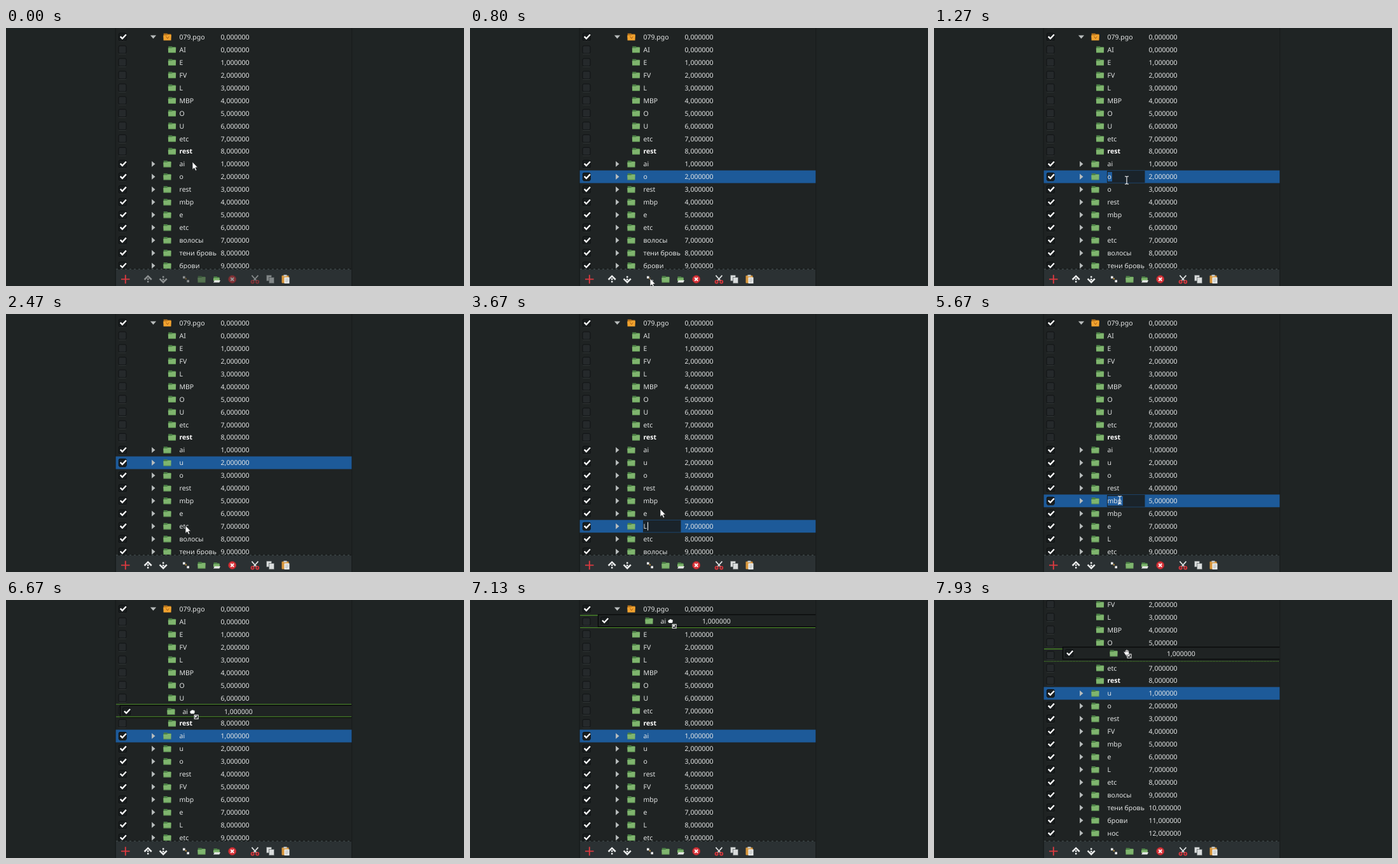
Animation of 720x405 px, one loop 8 s. Source, as an HTML page:

```html
<!DOCTYPE html>
<html lang="en">
<head>
<meta charset="utf-8">
<title>Layer list</title>
<style>
html, body { margin: 0; width: 100%; height: 100%; overflow: hidden; background: #1f2424; }
svg { display: block; width: 100vw; height: 100vh; }
text { font: 10.5px "Noto Sans", "Open Sans", sans-serif; fill: #e4e6e6; text-rendering: geometricPrecision; }
.bold { font-weight: 700; fill: #fff; }
</style>
</head>
<body>
<svg viewBox="0 0 720 405" xmlns="http://www.w3.org/2000/svg">
  <defs>
    <clipPath id="panel"><rect x="172.6" y="0" width="370.8" height="378"/></clipPath>
    <g id="box"><rect x="-6" y="-6" width="12" height="12" rx="2" fill="#25292b" stroke="#101314"/>
      <path d="M-5.5 6.9H5.5" stroke="#363b3c" stroke-width=".8"/></g>
    <g id="check"><rect x="-6" y="-6" width="12" height="12" rx="2" fill="#191d1e" stroke="#0e1112"/>
      <path d="M-5 6.9H5" stroke="#303536" stroke-width=".7"/>
      <path d="M-3.6 -.6L-.4 2.6L5.6 -3.8" fill="none" stroke="#fff" stroke-width="2.3"/></g>
    <g id="folder"><path d="M-5.8 -5.2H-.2L.8 -4.2H5.6V2H-5.8Z" fill="#4c8046"/>
      <path d="M-6.2 -2.4H-.4L1 -3.4H6.2L5.9 5H-5.9Z" fill="#7fb56e"/>
      <path d="M-5.9 4.7H5.9" stroke="#568a4d" stroke-width=".9"/></g>
    <g id="group"><path d="M-5.8 -5.4H-.2L.8 -4.4H5.8V1H-5.8Z" fill="#b8741c"/>
      <path d="M-6.2 -2.6H-.4L1 -3.6H6.4L6 5.4H-5.9Z" fill="#f2a32f"/>
      <path d="M-2 -.8L.4 2.6L2.6 -.6" fill="none" stroke="#a85d12"/></g>
    <path id="closed" d="M-2.4 -4.6L3 0L-2.4 4.6Z" fill="#b9bdbd"/>
    <path id="open" d="M-4.6 -2.4H4.6L0 2.8Z" fill="#b9bdbd"/>
    <path id="arrow" d="M0 0V12.4L2.9 9.8L5 14.2L7 13.2L5 9H8.6Z" fill="#fff" stroke="#15191a" stroke-width=".8"/>
    <path id="beam" d="M-3 -6H-1L0 -5L1 -6H3M0 -5V5M-3 6H-1L0 5L1 6H3" fill="none" stroke="#fff" stroke-width="1.1"/>
    <g id="target"><rect x="-3" y="-3" width="6" height="6" fill="#0d1011" stroke="#fff" stroke-width="1"/>
      <path d="M-1.6 -1.6H1L-1.6 1ZM-1 -1L1.8 1.8" fill="#fff" stroke="#fff" stroke-width=".8"/></g>
    <g id="fist"><path d="M-4 0L-2.6 -1V-2H-1V-2.8H1.6V-2H3.6V1.4L2.8 3H-2.4Z" fill="#fff"/><use href="#target" x="6.2" y="8.2"/></g>
    <g id="palm"><path d="M-5 -2.4L-4 -3.2L-2.6 -2V-5H-1V-6.2H.6V-5.4H2.2V-4.4H3.6V0L2.6 2.6H-2Z" fill="#fff" stroke="#15191a" stroke-width=".6"/>
      <path d="M-1 -4.6V-2M.6 -4.6V-2M2.2 -4V-2" stroke="#333" stroke-width=".6"/><use href="#target" x="4" y="4"/></g>
  </defs>
  <rect width="720" height="405" fill="#1f2424"/>
  <rect x="171.5" width="1.5" height="405" fill="#181c1c"/>
  <rect x="543" width="1.2" height="405" fill="#191d1d"/>
  <rect x="173" width="370" height="405" fill="#1f2323"/>
  <g id="list" clip-path="url(#panel)"></g>
  <rect x="173" y="378" width="370" height="27" fill="#2b3133"/>
  <path d="M173 378.4H543" stroke="#121616"/>
  <path d="M173 378.4H543" stroke="#465050" stroke-dasharray="3 4"/>
  <path d="M181 394.4H194.5M187.8 387.6V401.2" stroke="#dc3a40" stroke-width="1.9"/>
  <g id="tools">
    <g fill="none" stroke="#eceeee" stroke-width="2.5">
      <path d="M217.6 395L223.2 389.4L228.8 395"/><path d="M223.2 393V400" stroke-dasharray="2.4 1.6"/>
      <path d="M241.6 393.6L247.2 399.2L252.8 393.6"/><path d="M247.2 396V388.6" stroke-dasharray="2.4 1.6"/>
    </g>
    <rect x="278" y="389.6" width="3.6" height="3.6" fill="#eee"/>
    <rect x="281.6" y="392.4" width="2.4" height="2.4" fill="#a5803f"/>
    <rect x="284.4" y="395.6" width="3.6" height="3.6" fill="#eee"/>
    <use href="#folder" x="307.5" y="394.5"/>
    <circle cx="355.7" cy="394.4" r="6" fill="#d9363c" stroke="#a3262b"/>
    <path d="M353.3 392L358.1 396.8M358.1 392L353.3 396.8" stroke="#fff" stroke-width="1.8"/>
    <path d="M386.4 388.4L394 397M396.4 388.4L388.8 397" stroke="#dfe2e2" stroke-width="1.7"/>
    <g fill="none" stroke="#d9363c" stroke-width="1.8"><circle cx="387.6" cy="398.4" r="2.1"/><circle cx="395.2" cy="398.4" r="2.1"/></g>
    <g fill="#d9dcdc" stroke="#596061" stroke-width=".7"><rect x="409.4" y="388" width="8" height="9"/><rect x="413.4" y="391.4" width="8" height="9.4"/></g>
  </g>
  <path d="M326.5 390H331.5L332.5 391H335.5V396H326.5Z" fill="#4c8046"/>
  <path d="M326 392.6H335.8V397H326Z" fill="#7fb56e"/>
  <path d="M326 399.6L328 396H337L335.4 399.6Z" fill="#e4e8e4"/>
  <rect x="433.5" y="388.4" width="11" height="12" rx="1" fill="#d9973c"/>
  <rect x="436.5" y="387.4" width="5" height="2.6" fill="#c9cccc"/>
  <rect x="437.5" y="391.4" width="8" height="9.6" fill="#eef0f0"/>
  <path d="M439 394H444M439 396.3H444M439 398.6H443" stroke="#9aa0a0" stroke-width=".8"/>
  <g id="pointer"></g>
</svg>
<script>
const LOOP = 8000, STEP = 1000 / 15, PITCH = 19.95, TOP = 14;
const $ = id => document.getElementById(id);
const children = ['AI', 'E', 'FV', 'L', 'MBP', 'O', 'U', 'etc', 'rest'];

// Rows that are duplicated, then renamed by typing
const added = {
  u: { from: 870, was: 'o', edit: [1200, 1670], typed: [[1470, 'u']] },
  L: { from: 2800, was: 'etc', edit: [3270, 4600], typed: [[3530, 'L']] },
  FV: { from: 5270, was: 'mbp', edit: [5530, 6330], typed: [[5870, 'F'], [6000, 'FV']] }
};
const layers = ['ai', 'u', 'o', 'rest', 'FV', 'mbp', 'e', 'L', 'etc', 'волосы', 'тени бровь', 'брови', 'нос'];
const picks = [[330, 'o'], [870, 'u'], [2530, 'etc'], [2800, 'L'], [4670, 'mbp'], [5270, 'FV'], [6330, 'ai'], [7200, ''], [7530, 'u']];
const DROP = 7200;
const drags = [
  { name: 'ai', from: 6530, to: DROP, x: 287, y: 214, hand: 'fist', dash: '' },
  { name: 'u', from: 7590, to: LOOP, x: 274, y: 146, hand: 'palm', dash: '1.5 1' }
];
const path = [
  [0, 293, 210], [320, 285, 234], [400, 285, 234], [760, 283, 393], [900, 283, 393],
  [1130, 303, 239], [2030, 303, 239], [2460, 282, 332], [2600, 282, 332], [2760, 283, 393],
  [2840, 283, 393], [3060, 290, 333], [3330, 290, 333], [3660, 299, 306], [4560, 299, 306],
  [4660, 292, 294], [4780, 292, 294], [5060, 283, 393], [5270, 283, 393], [5460, 292, 292],
  [5930, 292, 292], [6260, 287, 214], [6500, 287, 214], [7060, 315, 33], [7200, 315, 33],
  [7460, 274, 146], [7570, 274, 146], [7920, 303, 84], [LOOP, 303, 84]
];
const scrollKeys = [[0, 0], [7240, 0], [7420, 67], [LOOP, 67]];

function along(keys, t) {
  const i = Math.max(1, keys.findIndex(k => k[0] >= t));
  const a = keys[i - 1], b = keys[i];
  const u = (t - a[0]) / (b[0] - a[0]), e = u * u * (3 - 2 * u);
  return a.slice(1).map((v, n) => v + (b[n + 1] - v) * e);
}
const latest = (list, t, start) => list.reduce((v, [at, value]) => t >= at ? value : v, start);
const use = (id, x, y) => `<use href="#${id}" x="${x}" y="${y}"/>`;
const text = (s, x, y, cls = '') => `<text x="${x}" y="${y + 3.9}" class="${cls}">${s}</text>`;
const value = n => n + ',000000';
const inside = (t, [a, b]) => t >= a && t < b;
const present = (name, t) => !added[name] || t >= added[name].from;

function entry(row, name, y, t) {
  const typed = t >= row.typed[0][0];
  const widths = { o: 7, mbp: 24, etc: 16, u: 7, L: 6, F: 6, FV: 12.5 };
  const w = widths[name];
  const mark = typed
    ? `<path d="M${273.6 + w} ${y - 6.5}V${y + 6.5}" stroke="#fff"/>`
    : `<rect x="273" y="${y - 7.5}" width="${w}" height="15" fill="#205d9e"/>`;
  return `<rect x="272" y="${y - 9.4}" width="59.5" height="18.8" fill="#1a232a"/>` + mark;
}

function layerRow(name, n, y, t, selected) {
  const row = added[name];
  const label = row ? latest(row.typed, t, row.was) : name;
  let s = selected ? `<rect x="172" y="${y - 9.9}" width="372" height="19.9" fill="#1d5a99"/>` : '';
  s += use('check', 183.3, y) + use('closed', 231.5, y) + use('folder', 253.5, y);
  if (row && inside(t, row.edit)) s += entry(row, label, y, t);
  return s + text(label, 272.5, y) + text(value(n), 337.6, y);
}

function dragged(d, x, y, scroll) {
  const dx = x - d.x, cy = y - .4;
  const over = TOP + PITCH * Math.round((y + scroll - TOP) / PITCH) - scroll;
  const line = (at, dash) => `<path d="M173 ${at}H543" stroke="#4f9428" stroke-width="1.1" stroke-dasharray="${dash}"/>`;
  return line(over - 9.8, '') +
    `<rect x="${173.5 + dx}" y="${cy - 9.6}" width="370" height="19" fill="#1f2323" stroke="#050606" stroke-width="1.2"/>` +
    use('check', 183.6 + dx, cy) + use('folder', 253.5 + dx, cy) +
    text(d.name, 271.5 + dx, cy) + text(value(1), 337 + dx, cy) +
    line(over + 9.6, d.dash);
}

function draw(t) {
  const [x, y] = along(path, t), [scroll] = along(scrollKeys, t);
  const picked = latest(picks, t, '');
  const rowY = i => TOP + i * PITCH - scroll;

  let s = use('check', 183.3, rowY(-1)) + use('folder', 253.5, rowY(-1));
  s += use('check', 183.3, rowY(0)) + use('open', 231.5, rowY(0)) + use('group', 253.5, rowY(0)) +
    text('079.pgo', 272.5, rowY(0)) + text(value(0), 337.6, rowY(0));
  children.forEach((name, i) => {
    const cy = rowY(i + 1);
    s += use('box', 183, cy) + use('folder', 261, cy) +
      text(name, 272.5, cy, name === 'rest' ? 'bold' : '') + text(value(i), 337.6, cy);
  });
  const rows = layers.filter(name => present(name, t) && !(name === 'ai' && t >= DROP));
  rows.forEach((name, i) => { s += layerRow(name, i + 1, rowY(i + 10), t, name === picked); });

  const drag = drags.find(d => inside(t, [d.from, d.to]));
  if (drag) s += dragged(drag, x, y, scroll);
  $('list').innerHTML = s;

  const editing = added[picked] && inside(t, added[picked].edit);
  const onEntry = editing && Math.abs(y - rowY(10 + rows.indexOf(picked))) < 10;
  $('pointer').innerHTML = use(drag ? drag.hand : onEntry ? 'beam' : 'arrow', x, y);
  $('tools').setAttribute('opacity', t < picks[0][0] ? .5 : 1);
}

const start = performance.now();
let shown = -1;
function tick() {
  const t = (performance.now() - start) % LOOP;
  const frame = Math.floor(t / STEP + .2);
  if (frame !== shown) {
    shown = frame;
    draw(Math.min(frame * STEP, LOOP - 1));
  }
  requestAnimationFrame(tick);
}
tick();
</script>
</body>
</html>
```
